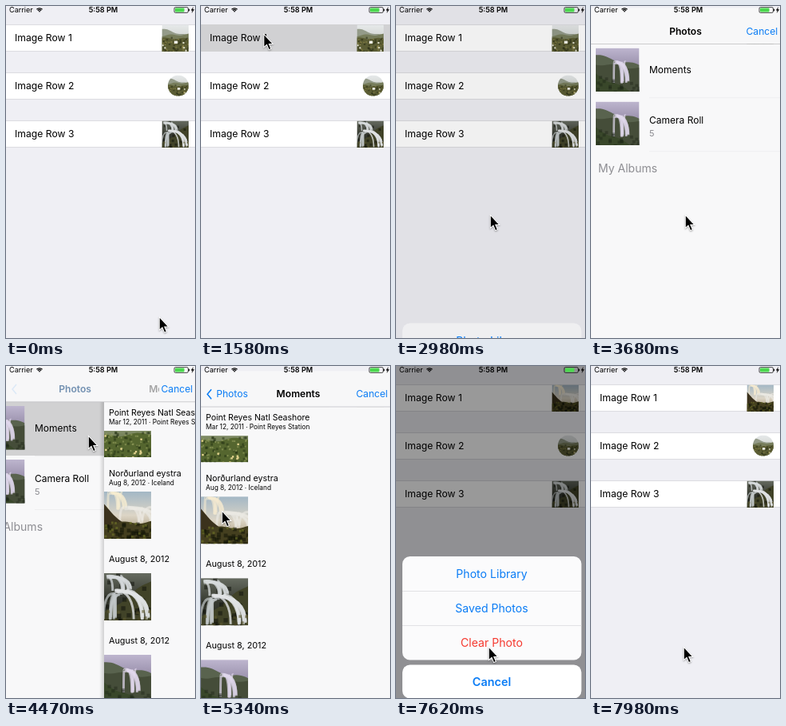
An HTML page with a canvas for the animation above (8000 ms loop, 237 by 415 pixels).

```html
<!DOCTYPE html>
<html lang="en">
<head>
<meta charset="utf-8">
<title>Image rows</title>
<style>
html, body { margin: 0; width: 100%; height: 100%; overflow: hidden; background: #efeff4; }
canvas { display: block; width: 237px; height: 415px; }
</style>
</head>
<body>
<canvas id="stage"></canvas>
<script>
const W = 237, H = 415, LOOP = 8000, STEP = 87.5;
const BLUE = '#0a7cf5', RED = '#f5392f', GRAY = '#8e8e93', PAPER = '#f8f8f9';
const canvas = document.getElementById('stage');
const ctx = canvas.getContext('2d');
const dpr = window.devicePixelRatio || 1;
canvas.width = W * dpr;
canvas.height = H * dpr;

const clamp = v => Math.max(0, Math.min(1, v));
const span = (t, start, length) => clamp((t - start) / length);
const easeOut = u => 1 - (1 - u) ** 3;
const smooth = u => u * u * (3 - 2 * u);
const mix = (a, b, u) => a + (b - a) * u;
const within = (t, a, b) => t >= a && t < b;

function seeded(seed) {
  return () => (seed = (seed * 16807) % 2147483647) / 2147483647;
}

function rect(x, y, w, h, color) {
  ctx.fillStyle = color;
  ctx.fillRect(x, y, w, h);
}

function panel(x, y, w, h, r, color) {
  ctx.beginPath();
  ctx.roundRect(x, y, w, h, r);
  ctx.fillStyle = color;
  ctx.fill();
}

function text(str, x, y, size, color = '#000', align = 'left', weight = 400) {
  ctx.font = `${weight} ${size}px Inter, Roboto, sans-serif`;
  ctx.textAlign = align;
  ctx.fillStyle = color;
  ctx.fillText(str, x, y);
}

// Pictures are layered from soft parts in a unit square.
function sky(...colors) {
  const g = ctx.createLinearGradient(0, 0, 0, 1);
  colors.forEach((c, i) => g.addColorStop(i / (colors.length - 1), c));
  rect(0, 0, 1, 1, g);
}

function hill(color, left, right, rough = .03) {
  ctx.beginPath();
  ctx.moveTo(0, 1);
  for (let x = 0; x <= 1.01; x += .05) {
    ctx.lineTo(x, mix(left, right, x) + rough * Math.sin(x * 9 + left * 20));
  }
  ctx.lineTo(1, 1);
  ctx.fillStyle = color;
  ctx.fill();
}

function water(color, x, top, bottom, width, lean) {
  const rnd = seeded(77);
  ctx.strokeStyle = color;
  ctx.lineWidth = .05;
  for (let i = 0; i < 9; i++) {
    const a = x + width * (rnd() - .5), b = x + lean + width * 1.5 * (rnd() - .5);
    ctx.beginPath();
    ctx.moveTo(a, top + rnd() * .08);
    ctx.bezierCurveTo(mix(a, b, .7), top, b, mix(top, bottom, .4), b, bottom - rnd() * .08);
    ctx.stroke();
  }
}

function flecks(color, count, top, size) {
  const rnd = seeded(count * 101 + 7);
  for (let i = 0; i < count; i++) {
    rect(rnd(), mix(top, 1, rnd()), size, size, color);
  }
}

const pictures = {
  meadow() {
    sky('#e6e9ea', '#d3d6d2', '#8d937a');
    hill('#949b89', .15, .42);
    hill('#777d5b', .4, .36);
    hill('#5b5d34', .5, .52);
    flecks('rgba(35,38,16,.5)', 34, .45, .07);
    flecks('rgba(160,150,85,.55)', 26, .5, .05);
    flecks('#e2e1d0', 5, .6, .06);
    rect(.46, .6, .13, .1, '#f4f4ec');
  },
  stream() {
    sky('#666b60', '#373a31', '#24261d');
    hill('#414328', .85, .15);
    flecks('rgba(15,17,10,.5)', 30, 0, .09);
    water('rgba(215,219,221,.75)', .2, .05, .4, .3, .15);
    water('rgba(225,228,229,.8)', .35, .35, 1, .25, .42);
    water('rgba(195,201,202,.7)', .3, .42, 1, .2, -.2);
    flecks('rgba(90,85,45,.6)', 14, .75, .06);
  },
  dawn() {
    sky('#a3b7c5', '#dcd5c6', '#9c8a68');
    water('rgba(247,236,208,.6)', .25, 0, .4, .3, 0);
    water('rgba(236,234,228,.65)', .72, .32, .68, .6, -.05);
    hill('#3b321d', .28, 1.2);
    hill('#443f1f', .68, .64);
    flecks('rgba(18,20,7,.55)', 36, .62, .08);
    flecks('rgba(112,117,40,.6)', 22, .62, .05);
  },
  dusk() {
    sky('#bdb5ce', '#9389a5', '#645d75');
    hill('#59634e', .16, .4);
    hill('#454d39', .36, .46);
    water('rgba(226,217,238,.7)', .56, .3, .82, .26, 0);
    hill('#39472a', .6, 1.1);
    flecks('rgba(26,34,20,.4)', 24, .62, .07);
  },
  grass() {
    sky('#aeb7a0', '#7b8760', '#4a5a2b');
    hill('#55662f', .55, .5);
    flecks('rgba(35,48,18,.5)', 50, .45, .05);
    flecks('rgba(150,160,95,.6)', 40, .45, .035);
    flecks('#e4d48f', 11, .5, .04);
  }
};

function picture(name, x, y, size, round) {
  ctx.save();
  ctx.beginPath();
  ctx.roundRect(x, y, size, size, round ? size / 2 : 0);
  ctx.clip();
  ctx.translate(x, y);
  ctx.scale(size, size);
  pictures[name]();
  ctx.restore();
}

function statusBar() {
  text('Carrier', 4, 8.3, 9.1);
  text('5:58 PM', 122, 8.3, 9.1, '#000', 'center', 600);
  ctx.strokeStyle = '#000';
  ctx.lineWidth = 1.3;
  for (const r of [1, 3, 5]) {
    ctx.beginPath();
    ctx.arc(42, 7.8, r, -Math.PI * .75, -Math.PI * .25);
    ctx.stroke();
  }
  ctx.lineWidth = .7;
  ctx.beginPath();
  ctx.roundRect(211, 1.6, 17.4, 6.8, 1.5);
  ctx.stroke();
  panel(212, 2.6, 11.6, 4.8, .8, '#4cd94f');
  rect(229, 3.7, 1.1, 2.6, '#000');
  ctx.fillStyle = '#000';
  ctx.fill(new Path2D('M235 1l-3.2 4.6h1.9l-.9 3.4 3.4-4.7h-2z'));
}

function form(t) {
  rect(0, 0, W, H, '#efeff4');
  const shade = [1570, 6640].some(on => within(t, on, on + 440)) ?
    1 - span(t, t < 4000 ? 1750 : 6830, 260) : 0;
  [t < 5300 ? 'meadow' : 'dawn', 'meadow', 'stream'].forEach((name, i) => {
    const y = 23 + i * 60;
    rect(0, y, W, 34, '#dcdce0');
    rect(0, y + 1, W, 32, '#fff');
    if (i === 0) rect(0, y, W, 34, `rgba(209,209,211,${shade})`);
    text('Image Row ' + (i + 1), 11, y + 20.8, 12.2);
    if (i === 1) picture(name, 203, y + 3.5, 26, true);
    else picture(name, 195.5, y + .5, 33.5);
  });
}

function sheetLevel(t) {
  const level = (show, hide, length) =>
    easeOut(span(t, show, 410)) * (1 - easeOut(span(t, hide, length)));
  return t < 4000 ? level(1600, 2758, 410) : level(6740, 7690, 280);
}

function sheet(level) {
  if (level <= 0) return;
  const y = 238 + 177 * (1 - level), solid = mix(.5, 1, level);
  panel(8, y, 224.5, 129.5, 9.5, `rgba(251,251,252,${solid})`);
  ['Photo Library', 'Saved Photos', 'Clear Photo'].forEach((label, i) => {
    text(label, 120, y + 27 + i * 43, 14.1, i === 2 ? RED : BLUE, 'center');
    if (i) rect(8, y + i * 43, 224.5, .7, '#d9d9dc');
  });
  panel(8, y + 135.5, 224.5, 42, 9.5, `rgba(255,255,255,${solid})`);
  text('Cancel', 120, y + 162, 14.4, BLUE, 'center', 600);
}

function albums(t) {
  rect(0, 45, W, 370, PAPER);
  if (t >= 4200) rect(0, 45, W, 67, '#d1d1d2');
  ['Moments', 'Camera Roll'].forEach((label, i) => {
    const y = 45 + i * 67;
    picture('dusk', 6, y + 5, 54.5);
    text(label, 73, y + 36.7 - i * 4, 12);
    rect(73, y + 67, W, .5, '#e4e4e7');
  });
  text('5', 73, 160.5, 11, GRAY);
  text('My Albums', 9, 205.7, 14, GRAY);
}

function moments() {
  rect(0, 45, W, 370, PAPER);
  ['grass', 'dawn', 'stream', 'dusk'].forEach((name, i) => {
    picture(name, 0, 55 + i * 102, 59);
  });
  rect(0, 45, W, 36, PAPER);
  text('Point Reyes Natl Seashore', 6, 61.5, 10.5);
  text('Mar 12, 2011 · Point Reyes Station', 6, 73, 8.3);
  text('Norðurland eystra', 6, 137.5, 10.7);
  text('Aug 8, 2012 · Iceland', 6, 149, 8.3);
  for (const y of [245, 347]) text('August 8, 2012', 6, y, 10.8);
}

function navBar(p) {
  rect(0, 0, W, 45, '#f7f7f8');
  rect(0, 44.5, W, .7, '#b9b9bd');
  const moving = p > 0 && p < 1;
  const tint = `rgb(${10 * p},${124 * p},${245 * p})`;
  ctx.globalAlpha = moving ? .55 : 1;
  text('Photos', mix(118.5, 39, p ** 1.25), 33, 12.1, tint, 'center', p < .9 ? 600 : 400);
  ctx.globalAlpha = p ** 3;
  ctx.strokeStyle = BLUE;
  ctx.lineWidth = 1.5;
  ctx.stroke(new Path2D('M13 23l-5 6 5 6'));
  ctx.globalAlpha = moving ? p * .7 : p;
  text('Moments', mix(285, 122, p), 33, 12.1, '#000', 'center', 600);
  ctx.globalAlpha = 1;
  rect(192, 16, 45, 24, '#f7f7f8');
  text('Cancel', 194.5, 33, 12.1, BLUE);
}

function picker(t) {
  const up = easeOut(span(t, 3300, 460)), down = smooth(span(t, 5300, 520));
  if (up === 0 || down === 1) return;
  const p = easeOut(span(t, 4380, 420)), x = W * (1 - p);
  ctx.save();
  ctx.translate(0, H * (1 - up + down));
  ctx.save();
  ctx.translate(-.325 * W * p, 0);
  albums(t);
  ctx.restore();
  const edge = ctx.createLinearGradient(x - 6, 0, x, 0);
  edge.addColorStop(0, 'rgba(0,0,0,0)');
  edge.addColorStop(1, 'rgba(0,0,0,.16)');
  if (p > 0) rect(x - 6, 45, 6, 370, edge);
  ctx.save();
  ctx.translate(x, 0);
  moments();
  ctx.restore();
  navBar(p);
  ctx.restore();
}

// Each move of the pointer; a ring shows before the release.
const moves = [
  { from: 0, to: 10, x: 192, y: 398, release: 165 },
  { from: 600, to: 1405, x: 78.5, y: 35, release: 1570 },
  { from: 2150, to: 2620, x: 118, y: 261, release: 2765 },
  { from: 3700, to: 4120, x: 103, y: 87, release: 4285 },
  { from: 4800, to: 5010, x: 26, y: 181, release: 5160 },
  { from: 5900, to: 6125, x: 149, y: 53 },
  { from: 6300, to: 6395, x: 162, y: 31, release: 6640 },
  { from: 7270, to: 7610, x: 116, y: 351, release: 7780 }
];

function pointer(t) {
  if (within(t, 165, 610)) return;
  let x = 192, y = 388.5;
  for (const m of moves) {
    const u = smooth(span(t, m.from, m.to - m.from));
    x = mix(x, m.x, u);
    y = mix(y, m.y, u);
    if (within(t, m.to + 70, m.release)) {
      ctx.beginPath();
      ctx.arc(x + 2.6, y + 2, 10.2, 0, 7);
      ctx.strokeStyle = '#000';
      ctx.lineWidth = 1;
      ctx.stroke();
    }
  }
  ctx.save();
  ctx.translate(x, y);
  const arrow = new Path2D('M.8 1.6v14l3.4-3 2.7 6.4 1.8-.8-2.7-6.2h4.6z');
  ctx.shadowColor = 'rgba(0,0,0,.35)';
  ctx.shadowBlur = 2 * dpr;
  ctx.shadowOffsetY = dpr;
  ctx.strokeStyle = '#fff';
  ctx.lineWidth = 2;
  ctx.stroke(arrow);
  ctx.shadowColor = 'transparent';
  ctx.fillStyle = '#000';
  ctx.fill(arrow);
  ctx.restore();
}

function draw(now) {
  const t = Math.floor((now % LOOP) / STEP + .1) * STEP;
  const level = sheetLevel(t);
  ctx.setTransform(dpr, 0, 0, dpr, 0, 0);
  form(t);
  picker(t);
  rect(0, 0, W, H, `rgba(0,0,0,${.4 * level ** .85})`);
  statusBar();
  sheet(level);
  pointer(t);
}

let start;
function tick(now) {
  start ??= now;
  draw(now - start);
  requestAnimationFrame(tick);
}
draw(0);
requestAnimationFrame(tick);
</script>
</body>
</html>
```
